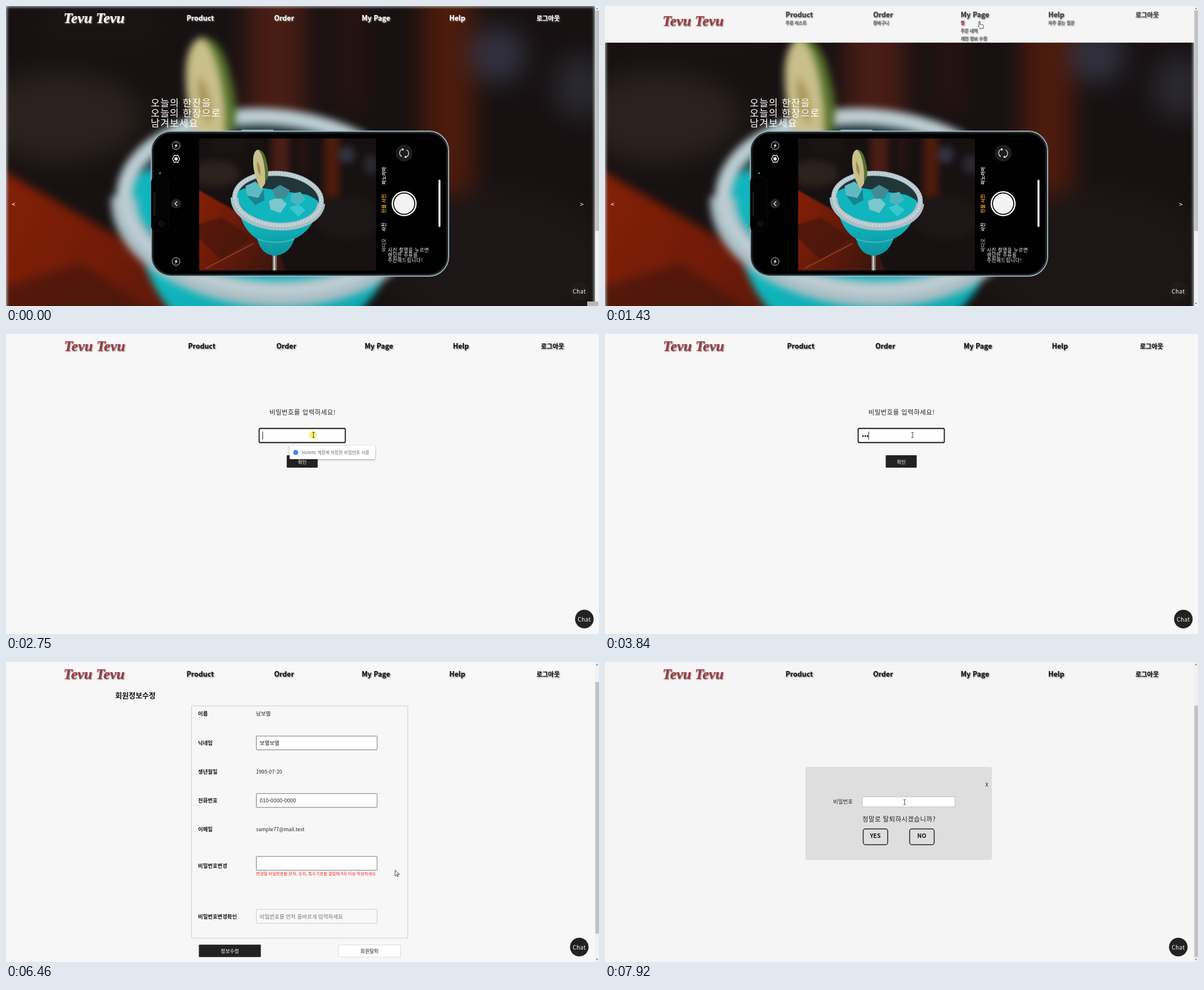
Write an HTML page that moves like this. It is 1053 px wide and 532 px high and loops after 8000 ms.

```html
<!DOCTYPE html>
<html lang="ko">
<head>
<meta charset="utf-8">
<style>
  html, body { margin: 0; width: 100%; height: 100%; overflow: hidden; background: #f7f7f7; }
  svg { display: block; }
  text { font-family: 'Noto Sans CJK KR', 'Noto Sans CJK', 'Noto Sans', sans-serif; white-space: pre; }
  .logo { font: italic 700 26px 'Liberation Serif', serif; }
  .shade { filter: drop-shadow(1.5px 1.5px 1px #0009); }
  .light { filter: drop-shadow(1.5px 1.5px 1px #bbb); }
</style>
</head>
<body>
<svg id="stage" width="1053" height="532" viewBox="0 0 1053 532"></svg>
<script>
const LOOP = 8000;
const clamp = v => Math.max(0, Math.min(1, v));
const smooth = (t, a, b) => { const p = clamp((t - a) / (b - a)); return p * p * (3 - 2 * p); };
const lerp = (a, b, p) => a + (b - a) * p;
const mix = (a, b, p) => `rgb(${a.map((v, i) => Math.round(lerp(v, b[i], p)))})`;
const grey = v => [v, v, v];

// Text is placed by its left (or middle) x and its optical centre y.
const text = (x, cy, size, str, fill = '#222', more = '') =>
  `<text x="${x}" y="${cy + size * .36}" font-size="${size}" fill="${fill}" ${more}>${str}</text>`;
const rect = (x, y, w, h, fill, more = '') =>
  `<rect x="${x}" y="${y}" width="${w}" height="${h}" fill="${fill}" ${more}/>`;
const circle = (x, y, r, fill, more = '') => `<circle cx="${x}" cy="${y}" r="${r}" fill="${fill}" ${more}/>`;
const ellipse = (x, y, rx, ry, fill, more = '') =>
  `<ellipse cx="${x}" cy="${y}" rx="${rx}" ry="${ry}" fill="${fill}" ${more}/>`;
const path = (d, fill, more = '') => `<path d="${d}" fill="${fill}" ${more}/>`;
const MID = 'text-anchor="middle" ', BOLD = 'font-weight="700" ';

// Cocktail picture, 314 x 234 units, used sharp in the phone and blurred behind it.
const blur = (id, amount) => `<filter id="${id}" filterUnits="userSpaceOnUse" x="-40" y="-40" width="400" height="320"
  color-interpolation-filters="sRGB"><feGaussianBlur stdDeviation="${amount}"/></filter>`;
const scene = `<defs>
  <linearGradient id="table" x2="1" y2=".6"><stop stop-color="#8a2206"/><stop offset=".45" stop-color="#701b08"/><stop offset="1" stop-color="#3a150e"/></linearGradient>
  <linearGradient id="drink" y2="1" x2=".2"><stop stop-color="#10c0c6"/><stop offset="1" stop-color="#0c96a0"/></linearGradient>
  ${blur('soft', 6)}${blur('edge', 1.6)}
  <g id="scene">
    ${rect(-20, -20, 360, 280, '#171112')}
    <g filter="url(#soft)">
      ${ellipse(28, 62, 44, 24, '#2b221d')}${rect(20, -20, 60, 45, '#1b1413')}
      ${rect(128, -20, 32, 95, '#481d15')}${rect(176, -20, 16, 80, '#281410')}
      ${rect(222, -20, 28, 125, '#4c1b0d')}
      ${circle(262, 29, 15, '#31313f')}${ellipse(306, 46, 14, 17, '#2a2930')}
      ${ellipse(262, 140, 60, 40, '#1d1616')}
    </g>
    <g filter="url(#edge)">
      ${path('M-20 80L60 126 130 166 162 260H-20z', 'url(#table)')}
      ${path('M-20 158L40 140 95 176 40 215z', '#45160d', 'opacity=".7"')}
    </g>
    ${path('M12 230L97 186', 'none', 'stroke="#8a472a" stroke-width="1.6"')}
    ${rect(130, 200, 8, 40, '#6a6a66')}${rect(132, 205, 3, 35, '#c7c3bb')}
    ${path('M72 135Q82 166 103 178Q110 206 134 208Q161 205 169 178Q196 166 208 135Z', 'url(#drink)')}
    ${path('M103 178Q136 190 169 178', 'none', 'stroke="#4fb4bb" stroke-width="2"')}
    <g transform="rotate(4 140 108)">
      ${ellipse(140, 108, 77, 45, '#22363a')}
      ${path('M64 104Q74 90 100 89L190 96Q214 104 214 112Q196 151 140 151Q80 148 64 104Z', '#10b5bd')}
      ${path('M81 88l17-9 15 12-8 17-20-3z', '#5fb9c3')}${path('M85 105l20 3 8-17 3 20-16 10z', '#1b818d')}
      ${path('M124 112l18-9 14 12-10 17-18-5z', '#7cc6cd')}${path('M128 92l14-10 18 8-6 15-18 2z', '#3f8c97')}
      ${path('M163 96l16-4 10 13-13 11-14-6z', '#4db3bd')}${path('M161 121l15-7 14 9-12 13z', '#37c8cd')}
      <g fill="none" stroke="#a9bdc4">
        ${ellipse(140, 108, 77, 46, 'none', 'stroke-width="9"')}
        ${path('M63 110A77 46 0 0 0 217 110', 'none', 'stroke-width="14"')}
        ${ellipse(140, 108, 77, 46, 'none', 'stroke="#d5e2e6" stroke-width="6" stroke-dasharray="1.6 1.2 .8 1.7"')}
      </g>
    </g>
    ${path('M102 20Q115 17 120 42Q124 55 122 68L112 88z', '#55702c')}
    ${path('M96 34Q98 20 105 20Q114 28 117 60L117 80 110 90Q94 62 96 34z', '#c9bf8b')}
    ${path('M103 40Q110 50 109 66Q101 58 103 40z', '#a38e52')}
  </g></defs>`;

const shot = (x, y, w, h, box) =>
  `<svg x="${x}" y="${y}" width="${w}" height="${h}" viewBox="${box}" preserveAspectRatio="none"><use href="#scene"/></svg>`;
const upright = (cy, str, fill = '#ddd') =>
  text(0, 0, 8.5, str, fill, `${MID} ${BOLD} transform="translate(671 ${cy}) rotate(-90)"`);
const lines = (x, y, step, size, list) => list.map((s, i) =>
  text(x, y + i * step, size, s, '#fff', `font-weight="300" letter-spacing="${size * .06}"`)).join('');
const ring = (x, y, r) => circle(x, y, r, '#111', 'stroke="#ccc" stroke-width="1"');
const bolt = (x, y) => path(`M${x + 2} ${y - 4}l-5 4.5h2.6l-1.6 4 5-5h-2.6z`, '#eee');

const phone = `
  ${rect(418, 219.5, 57, 3, '#a9bdc6', 'rx="1"')}
  ${rect(258, 222, 528, 257, '#000', 'rx="35" stroke="#9db2bd" stroke-width="2"')}
  ${rect(260.5, 224.5, 523, 252, 'none', 'rx="33" stroke="#2b3439" stroke-width="2"')}
  ${rect(258, 303, 31, 97, '#030303', 'rx="9" stroke="#0e0e0e"')}${rect(262, 330, 3, 42, '#1c1c1c', 'rx="1.5"')}
  ${circle(273.5, 296.5, 1.6, '#28b9b4')}${circle(276, 386, 4.5, '#0d0d10', 'stroke="#222"')}
  ${shot(343, 235, 314, 234, '0 0 314 234')}
  ${ring(302, 247.5, 7)}${bolt(302, 247.5)}${ring(302, 453, 7)}${bolt(302, 453)}
  ${path('M295.5 271l3.2-6h6.6l3.2 6-3.2 6h-6.6z', '#111', 'stroke="#eee" stroke-width="1.3"')}${circle(302, 271, 3, '#eee')}
  ${circle(302, 350.5, 8.5, '#262626')}${path('M304 346.5l-4 4 4 4', 'none', 'stroke="#eee" stroke-width="1.2"')}
  ${circle(707, 261, 15, '#1d1d1d')}
  ${path('M703 267a7 7 0 0 1 1-13M711 255a7 7 0 0 1-1 13', 'none', 'stroke="#eee" stroke-width="1.2"')}
  ${path('M703 252l4 2-3 3zM711 270l-4-2 3-3z', '#eee')}
  ${upright(301, '파노라마')}${upright(350.5, '인물 사진', '#dc9a3a')}${upright(392, '사진')}${upright(424, '비디오', '#999')}
  ${circle(707, 350.5, 21, 'none', 'stroke="#f2f2f2" stroke-width="2.6"')}${circle(707, 350.5, 18, '#f2f2f2')}
  ${rect(768, 308, 3.5, 84, '#f4f4f4', 'rx="1.7"')}
  ${lines(678, 433, 9, 8.6, ['사진 촬영을 누르면', '랜덤한 주류를', '추천해드립니다!'])}`;

const home = `
  ${rect(0, 0, 1053, 532, '#161213')}
  <g style="filter:blur(7px)">${shot(-20, -20, 1086, 572, '-6 -3 326 171.7')}</g>
  ${rect(-2, -2, 1050, 560, 'none', 'stroke="#b9c4c4" stroke-width="7" style="filter:blur(2.5px)"')}
  ${lines(257, 172, 18, 17.3, ['오늘의 한잔을', '오늘의 한장으로', '남겨보세요'])}
  ${phone}
  ${text(10, 352, 12, '&lt;', '#fff')}${text(1019, 352, 12, '&gt;', '#fff')}`;

const login = `
  ${text(526.5, 139, 11.4, '비밀번호를 입력하세요!', '#222', MID + 'letter-spacing=".5"')}
  ${rect(498.5, 215, 55, 22, '#222', 'rx="1"')}${text(526, 226.5, 8.5, '확인', '#fff', MID)}`;

const field = (y, str = '', fill = '#fff', stroke = '#767676', ink = '#222') =>
  rect(444.5, y, 214.5, 24.5, fill, `rx="1" stroke="${stroke}"`) + text(450.5, y + 12.5, 9.5, str, ink);
const label = (y, str) => text(341, y, 9.4, str, '#111', BOLD);
const profile = `
  ${text(194, 60.5, 13, '회원정보수정', '#111', BOLD)}
  ${rect(329.5, 78.5, 384, 412, 'none', 'stroke="#ccc"')}
  ${label(92.5, '이름')}${text(444, 92.5, 9.4, '남보별')}
  ${label(144.5, '닉네임')}${field(132, '보별보별')}
  ${label(195.5, '생년월일')}${text(444, 195.5, 9, '1995-07-20')}
  ${label(246, '전화번호')}${field(234, '010-0000-0000')}
  ${label(297.5, '이메일')}${text(444, 297.5, 9, 'sample77@mail.test')}
  ${label(362.5, '비밀번호변경')}${field(345.5)}
  ${text(444, 376.5, 7.3, '변경할 비밀번호를 문자, 숫자, 특수기호를 결합해 8자 이상 작성하세요', '#f22')}
  ${label(452.5, '비밀번호변경확인')}${field(439.5, '비밀번호를 먼저 올바르게 입력하세요', '#f8f8f8', '#ccc', '#777')}
  ${rect(342.5, 502, 110, 22, '#222', 'rx="1"')}${text(397.5, 513.5, 8.8, '정보수정', '#fff', MID)}
  ${rect(590.5, 502.5, 110, 21.5, '#fff', 'stroke="#ddd"')}${text(645.5, 513.5, 8.8, '회원탈퇴', '#222', MID)}`;

const choice = (x, str) => rect(x, 296, 43.5, 28, 'none', 'rx="4" stroke="#222" stroke-width="1.5"') +
  text(x + 21.5, 308.5, 10.5, str, '#111', MID + BOLD);
const modal = `
  ${rect(0, 0, 1046, 532, '#f5f5f5')}${rect(356, 186, 331, 165, '#dedede', 'rx="4"')}
  ${text(678, 218, 9.5, 'X', '#222', MID)}${text(405, 248, 9.5, '비밀번호')}
  ${rect(457, 239, 164.5, 18, '#fff', 'stroke="#bbb"')}
  ${text(457, 279, 11.5, '정말로 탈퇴하시겠습니까?', '#222', 'letter-spacing=".4"')}
  ${choice(458.5, 'YES')}${choice(541, 'NO')}`;

const $ = id => document.getElementById(id);
$('stage').innerHTML = scene + `
  <g id="home">${home}</g><g id="login">${login}<g id="entry"></g></g>
  <g id="profile">${profile}</g><g id="modal">${modal}</g><g id="top"></g>`;

const menu = [
  [320.5, 'Product', ['주류 리스트']], [476, 'Order', ['장바구니']],
  [631.5, 'My Page', ['찜', '주문 내역', '개인 정보 수정']],
  [787, 'Help', ['자주 묻는 질문']], [942, '로그아웃', []]];

function header(t, page) {
  const open = page === 0 ? 1 - (1 - clamp((t - 695) / 435)) ** 2
    : page === 1 ? 1 - smooth(t, 2400, 2720) : 0;
  const tint = page ? 1 : smooth(t, 800, 1270);
  const wide = page === 1 ? 1.0083 : 1;
  const ink = mix(grey(255), grey(page ? 17 : 62), tint);
  const hot = t > 1130 && t < 1500 ? '찜' : t >= 1560 ? '개인 정보 수정' : '';
  let out = text(102 * wide, 20.5 + 5 * open, 26, 'Tevu Tevu', mix(grey(255), [160, 58, 64], tint), 'class="logo"');
  for (const [x, name, subs] of menu) {
    const size = subs.length ? 12.4 : 11.2;
    out += text(x * wide, 21.5 - 6 * open, size, name, ink, 'font-weight="900"');
    if (open > 0) subs.forEach((s, i) => out += text(x * wide, 36 - 6 * open + i * 14, 7.7, s,
      s === hot ? '#b22832' : mix(grey(255), grey(105), tint), BOLD));
  }
  const height = page === 2 ? 27.5 : 65 * open;
  return rect(0, 0, page === 1 ? 1053 : 1046, height, page === 2 ? (t > 7220 ? '#f5f5f5' : '#f8f8f8') : '#f5f5f5') +
    `<g class="${tint < .3 ? 'light' : 'shade'}">${out}</g>`;
}

const keys = [3530, 3700, 3840, 4040, 4660, 4830, 4950, 5150, 5380];
function passwordEntry(t) {
  const focused = t > 2680;
  let out = focused ? rect(449.5, 167.5, 153, 25, '#fff', 'rx="2" stroke="#111" stroke-width="1.8"')
    : rect(449.5, 167.5, 153, 25, '#fff', 'rx="1" stroke="#767676"');
  if (!focused) return out;
  const typed = keys.filter(k => k <= t);
  typed.forEach((_, i) => out += circle(458 + 4.1 * i, 181, 1.5, '#111'));
  if ((t - (typed.at(-1) ?? 2780)) % 1060 < 530) out += rect(455.3 + 4.1 * typed.length, 173, 1, 14, '#111');
  const shown = 1 - clamp((t - 3530) / 150);
  if (shown) out += `<g opacity="${shown}" style="filter:drop-shadow(0 1px 1.5px #0006)">
    ${path('M511 198.5l4-4 4 4z', '#fff')}${rect(503.5, 198, 152, 24, '#fff', 'rx="2"')}
    ${circle(514.5, 210, 4.5, '#4285f4')}${text(525, 210.5, 7.8, 'Vuneto 계정에 저장된 비밀번호 사용', '#666')}</g>`;
  return out;
}

function scrollbar(page, scroll) {
  if (page === 1) return '';
  const [y, h] = page ? [8 + scroll * .845, 446] : [8, 391];
  return rect(1046, 0, 7, 532, '#f1f1f1') + rect(1046.5, y, 6.5, h, '#c1c1c1') +
    path('M1047.5 5.5h4l-2-2.5zM1047.5 526.5h4l-2 2.5z', '#777');
}

const stops = [[340, 1042, 512], [750, 694, 41], [1130, 665, 27], [1430, 665, 27], [1620, 655, 57], [2340, 655, 57],
  [2680, 546, 179], [6090, 546, 179], [6460, 691, 369], [6840, 673, 466], [7610, 673, 466], [7920, 532, 248.5]];
const shapes = {
  arrow: path('M0 0v10.5l2.5-2.3 1.7 3.7 1.5-.7-1.7-3.6h3.4z', '#fff', 'stroke="#111" stroke-width=".8"'),
  hand: path('M-1 1q1-1.8 2 0v4.5l5 1q1.5.5 1.2 2.5l-.8 4h-5.5l-3.3-4.5q0-1.5 1.4-.8z', '#fff', 'stroke="#111" stroke-width=".8"'),
  beam: path('M-2-4.5h1.5L0-4l.5-.5H2M0-4V4M-2 4.5h1.5L0 4l.5.5H2', 'none', 'stroke="#222" stroke-width=".9"')
};
function pointer(t) {
  if (t < 340) return '';
  const i = stops.findLastIndex(s => s[0] <= t);
  const a = stops[i], b = stops[i + 1] ?? a;
  const p = smooth(t, a[0], b[0] + (a === b));
  const x = lerp(a[1], b[1], p), y = lerp(a[2], b[2], p);
  const kind = t < 5670 && t > 2600 || t > 7860 ? 'beam'
    : t > 730 && t < 2400 || t > 6780 && t < 7220 ? 'hand' : 'arrow';
  const click = [1680, 2680, 7160].some(c => t >= c && t < c + 190);
  return (click ? circle(x - 1, y, 7, '#f7f05a', 'opacity=".85"') : '') +
    `<g transform="translate(${x} ${y})">${shapes[kind]}</g>`;
}

function draw() {
  const t = performance.now() % LOOP;
  const page = t < 1800 ? 0 : t < 5670 ? 1 : 2;
  const scroll = 82 * smooth(t, 6340, 6620);
  const fade = clamp((t - 7200) / 180);
  ['home', 'login', 'profile'].forEach((id, i) => $(id).style.display = i === page ? '' : 'none');
  $('profile').setAttribute('transform', `translate(0 ${32 - scroll})`);
  $('modal').style.display = fade ? '' : 'none';
  $('modal').setAttribute('opacity', fade);
  if (page === 1) $('entry').innerHTML = passwordEntry(t);
  const chatX = page === 1 ? 1027 : 1018;
  $('top').innerHTML = header(t, page) +
    circle(chatX, 505.5, 16.5, '#222', page ? '' : 'opacity=".5"') +
    text(chatX, 506.5, 10, 'Chat', '#fff', MID + 'letter-spacing=".5"') +
    scrollbar(page, scroll) +
    (t < 80 ? rect(1032, 524, 20, 8, '#b5bab5', `opacity="${1 - t / 100}"`) : '') +
    pointer(t);
  requestAnimationFrame(draw);
}
draw();
</script>
</body>
</html>
```
